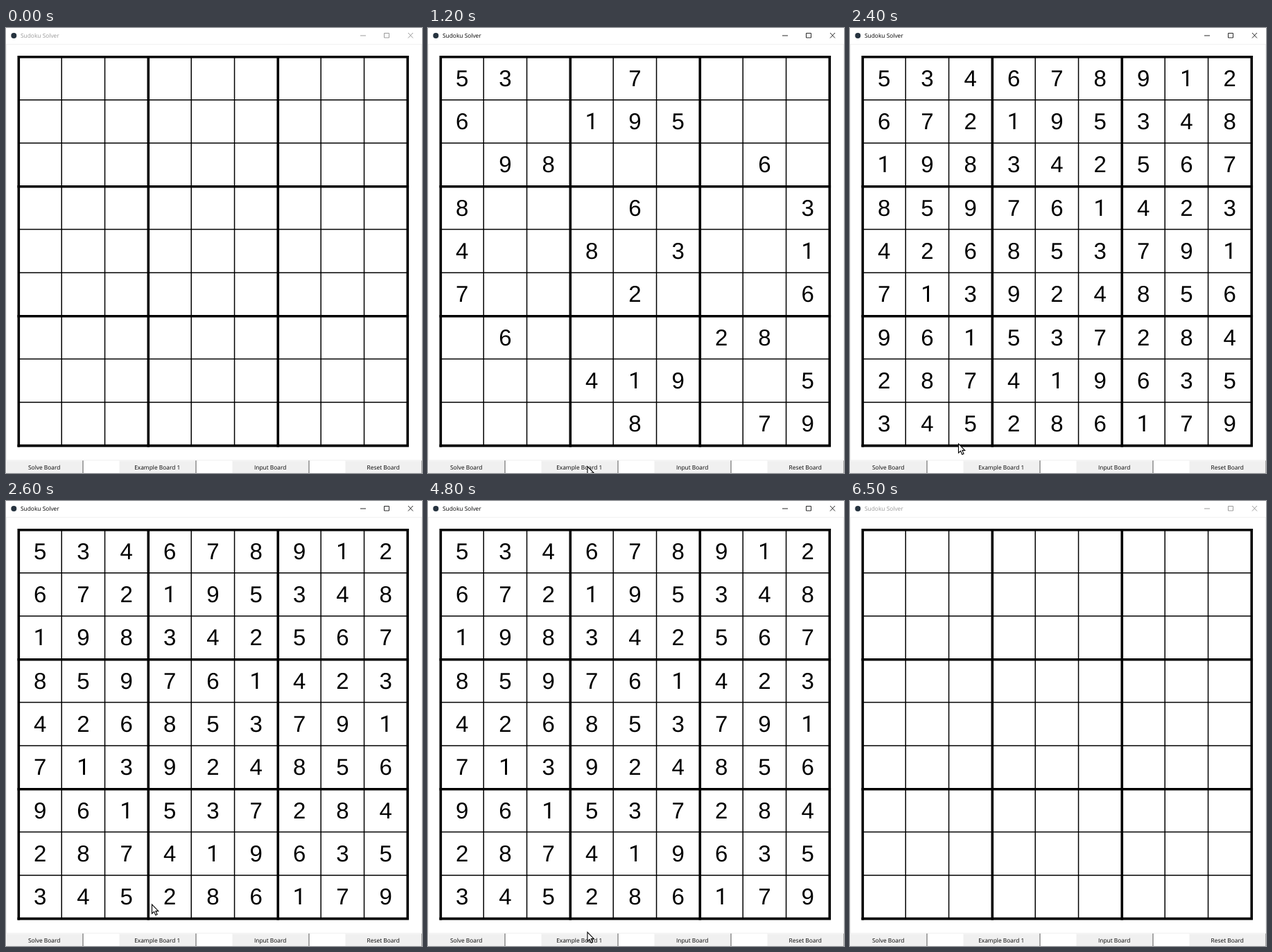
An HTML page that plays this animation: 600x642 px, repeating every 6600 ms.

```html
<!DOCTYPE html>
<html lang="en">
<head>
<meta charset="utf-8">
<title>Sudoku Solver</title>
<style>
  html, body { margin: 0; width: 100%; height: 100%; overflow: hidden; background: #fff; }
  svg { display: block; width: 600px; height: 642px; }
  text { text-rendering: geometricPrecision; }
  .ui { font: 8.4px "Open Sans", "Noto Sans", sans-serif; }
  .digit { font: 33px "Liberation Sans", Arial, sans-serif; text-anchor: middle; }
  .plain { font-family: Roboto, sans-serif; }
  .label { text-anchor: middle; }
</style>
</head>
<body>
<svg id="stage" viewBox="0 0 600 642"></svg>
<script>
const LOOP = 6600, STEP = 100;
const LEFT = 18.3, TOP = 41.7, CELL = 62.33;
const PITCH = 163;
const BUTTONS = ["Solve Board", "Example Board 1", "Input Board", "Reset Board"];

const PUZZLE =
  "53..7...." + "6..195..." + ".98....6." +
  "8...6...3" + "4..8.3..1" + "7...2...6" +
  ".6....28." + "...419..5" + "....8..79";

// The pointer rests on a button around each click
const HOLD = 100, REST = [-300, 200];
const CLICKS = [{ at: 1000, x: 230 }, { at: 1900, x: 57 }, { at: 5500, x: 540 }]
  .map(c => ({ ...c, button: Math.floor(c.x / PITCH) }));
const BLUR_AT = 6400;

const point = (t, x, y) => ({ t, x, y });
const offstage = (t, x) => point(t, x, 658);
const path = [
  offstage(0, 240), offstage(300, 240),
  point(2600, 210.5, 582), offstage(3100, 300),
  offstage(4400, 196), point(4800, 230, 622),
  offstage(6000, 556), offstage(LOOP, 556),
  ...CLICKS.flatMap(c => REST.map(d => point(c.at + d, c.x, 632.5)))
].sort((a, b) => a.t - b.t);

// Backtracking search; peers share a row, a column or a box
function solve(board) {
  const i = board.indexOf(".");
  if (i < 0) return board;
  const row = n => Math.floor(n / 9), col = n => n % 9;
  const box = n => Math.floor(row(n) / 3) * 3 + Math.floor(col(n) / 3);
  const used = new Set([...board].filter((_, j) =>
    row(j) === row(i) || col(j) === col(i) || box(j) === box(i)));
  for (const d of "123456789") {
    if (used.has(d)) continue;
    const done = solve(board.slice(0, i) + d + board.slice(i + 1));
    if (done) return done;
  }
  return null;
}

const stage = document.getElementById("stage");

function add(tag, attrs, parent = stage) {
  const el = document.createElementNS("http://www.w3.org/2000/svg", tag);
  for (const key in attrs) el.setAttribute(key, attrs[key]);
  return parent.appendChild(el);
}

function addText(text, attrs, parent) {
  const el = add("text", attrs, parent);
  el.textContent = text;
  return el;
}

function buildTitleBar() {
  add("circle", { cx: 11.3, cy: 11, r: 4, fill: "#26333f" });
  const title = addText("Sudoku Solver", { class: "ui", x: 21, y: 14 });
  const controls = add("path", {
    d: "M511 11H519M545.5 7.5h7v6.5h-7zM580 7l7 7.5M587 7l-7 7.5",
    fill: "none", "stroke-width": 0.9
  });
  return active => {
    title.setAttribute("fill", active ? "#000" : "#999");
    controls.setAttribute("stroke", active ? "#111" : "#909090");
  };
}

function buildGrid() {
  add("rect", { x: 0.5, y: 23.5, width: 599, height: 600, fill: "#fff", stroke: "#f1f1f1" });
  const size = 9 * CELL;
  for (let i = 0; i < 10; i++) {
    const thick = i % 3 === 0;
    const shift = i * CELL - (thick ? 0 : 0.4);
    add("path", {
      d: `M${LEFT + shift} ${TOP}v${size}M${LEFT} ${TOP + shift}h${size}`,
      stroke: "#000", "stroke-width": thick ? 3.6 : 1.5, "stroke-linecap": "square"
    });
  }
}

function buildDigits(board) {
  const group = add("g", {});
  [...board].forEach((ch, i) => {
    if (ch === ".") return;
    addText(ch, {
      class: ch === "1" ? "digit plain" : "digit", // a "1" without a foot
      x: 49.1 + (i % 9) * CELL,
      y: 83.7 + Math.floor(i / 9) * CELL
    }, group);
  });
  return group;
}

function buildButton(label, i) {
  const x = i * PITCH;
  add("rect", { x, y: 624, width: 111.5, height: 18, fill: "#f0f0f0" });
  const light = add("path", { d: `M${x + 0.4} 642V624.4H${x + 111}`, fill: "none", "stroke-width": 0.8 });
  const dark = add("path", { d: `M${x + 111} 624V642`, fill: "none", "stroke-width": 1.1 });
  const text = addText(label, { class: "ui label", x: x + 55.2, y: 636.6 });
  return down => {
    light.setAttribute("stroke", down ? "#696969" : "#fafafa");
    dark.setAttribute("stroke", down ? "#fafafa" : "#696969");
    text.setAttribute("transform", down ? "translate(0.8 0.8)" : "");
  };
}

const setActive = buildTitleBar();
buildGrid();
const puzzle = buildDigits(PUZZLE);
const solved = buildDigits(solve(PUZZLE));
const setDown = BUTTONS.map(buildButton);
const pointer = add("path", {
  d: "M0 0V13.2L3.1 10.4L5.3 15.5L7.6 14.5L5.4 9.6H9.3Z",
  fill: "#fff", stroke: "#000", "stroke-width": 1.1
});

function pointerAt(t) {
  const i = path.findIndex(p => p.t > t);
  const a = path[i - 1], b = path[i];
  const u = (t - a.t) / (b.t - a.t), e = u * u * (3 - 2 * u);
  return [a.x + (b.x - a.x) * e, a.y + (b.y - a.y) * e];
}

function show(el, on) {
  el.setAttribute("visibility", on ? "visible" : "hidden");
}

function render(t) {
  const [loadAt, solveAt, resetAt] = CLICKS.map(c => c.at + HOLD);
  setActive(t >= CLICKS[0].at && t < BLUR_AT);
  show(puzzle, t >= loadAt && t < solveAt);
  show(solved, t >= solveAt && t < resetAt);
  setDown.forEach((set, i) =>
    set(CLICKS.some(c => c.button === i && t >= c.at && t < c.at + HOLD)));
  pointer.setAttribute("transform", `translate(${pointerAt(t)})`);
}

const start = performance.now();
function tick() {
  const t = (performance.now() - start) % LOOP;
  render(Math.floor(t / STEP) * STEP);
  requestAnimationFrame(tick);
}
tick();
</script>
</body>
</html>
```
